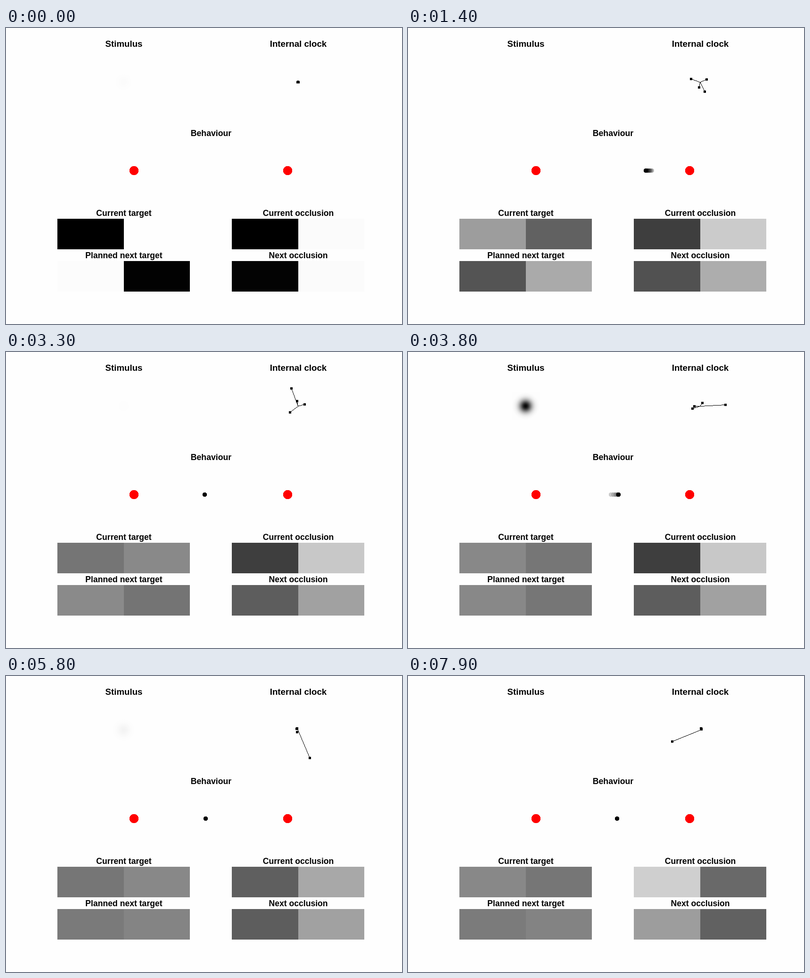
Recreate the animation shown at these times as an HTML page with a canvas. Size 840 by 630 pixels, loop 8 s.

```html
<!DOCTYPE html>
<html lang="en">
<head>
<meta charset="utf-8">
<title>Internal clock</title>
<style>
html, body { margin: 0; width: 100%; height: 100%; overflow: hidden; background: #fefefe; }
canvas { display: block; }
</style>
</head>
<body>
<canvas id="stage" width="840" height="630"></canvas>
<script>
const ctx = document.getElementById('stage').getContext('2d');
const LOOP = 8000, STEP = 100;
const BEAT = 1675, FIRST_FLASH = 420, FLASHES = 4;

// Each hand turns clockwise at its own rate (degrees per ms) and changes length once.
const hands = [
  { phase: 100, rate: 360 / BEAT, early: 20, late: 64, when: 3350, width: 350 },
  { phase: -7, rate: 0.041, early: 22, late: 4, when: 3900, width: 120 },
  { phase: 21, rate: 0.0855, early: 11, late: 4, when: 3900, width: 120 },
  { phase: 201, rate: 0.384, early: 15, late: 4, when: 3900, width: 120 }
];

const titles = [
  ['Stimulus', 250, 40, 18.7], ['Internal clock', 620, 40, 18.7], ['Behaviour', 435, 230, 17.7],
  ['Current target', 250, 400, 17.6], ['Current occlusion', 620, 400, 17.6],
  ['Planned next target', 250, 490, 17.6], ['Next occlusion', 620, 490, 17.6]
];

// Smooth step from 0 to 1, and a soft square wave that flips sign on every beat.
const ramp = (t, when, width) => 1 / (1 + Math.exp((when - t) / width));
const square = (t, flip) => Math.tanh(6 * Math.sin(Math.PI * (t - flip) / BEAT));
const bell = d => Math.exp(-d * d / 2);
const decay = (t, tau) => Math.exp((500 - t) / tau);
const gray = v => {
  const c = Math.round(Math.min(255, Math.max(0, v)));
  return `rgb(${c},${c},${c})`;
};

// Hard-edged disc around the centre of pixel (x, y).
function disc(x, y, r, color) {
  ctx.fillStyle = color;
  const reach = Math.floor(r);
  for (let dy = -reach; dy <= reach; dy++) {
    const half = Math.floor(Math.sqrt(r * r - dy * dy));
    ctx.fillRect(Math.round(x) - half, y + dy, 2 * half + 1, 1);
  }
}

// Hard-edged line, one pixel wide.
function line(x0, y0, x1, y1) {
  const n = Math.max(Math.abs(x1 - x0), Math.abs(y1 - y0), 1);
  for (let i = 0; i <= n; i++) {
    ctx.fillRect(Math.round(x0 + (x1 - x0) * i / n), Math.round(y0 + (y1 - y0) * i / n), 1, 1);
  }
}

function pair(x, y, left, right) {
  ctx.fillStyle = gray(left);
  ctx.fillRect(x, y, 141, 65);
  ctx.fillStyle = gray(right);
  ctx.fillRect(x + 141, y, 140, 65);
}

function drawTitles() {
  ctx.fillStyle = '#000';
  ctx.textAlign = 'center';
  for (const [text, x, y, size] of titles) {
    ctx.font = `bold ${size}px "Liberation Sans", Arial, sans-serif`;
    ctx.fillText(text, x, y);
  }
}

function drawStimulus(t) {
  const x = 249.5, y = 115, r = 30, stops = 15;
  let strength = 0;
  for (let i = 0; i < FLASHES; i++) strength += bell((t - FIRST_FLASH - i * BEAT) / 142);
  const glow = ctx.createRadialGradient(x, y, 0, x, y, r);
  for (let i = 0; i <= stops; i++) {
    const alpha = strength * bell(i / stops * r / 9.2);
    glow.addColorStop(i / stops, `rgba(0,0,0,${alpha.toFixed(4)})`);
  }
  ctx.fillStyle = glow;
  ctx.fillRect(x - r, y - r, 2 * r, 2 * r);
}

function drawClock(t) {
  const cx = 619, cy = 115;
  ctx.fillStyle = '#000';
  for (const { phase, rate, early, late, when, width } of hands) {
    const a = (phase - rate * t) * Math.PI / 180;
    const length = ramp(t, 250, 90) * (early + (late - early) * ramp(t, when, width));
    const x = Math.round(cx + length * Math.cos(a));
    const y = Math.round(cy - length * Math.sin(a));
    line(cx, cy, x, y);
    ctx.fillRect(x - 2, y - 2, 5, 5);
  }
}

// One wide swing to the right, then small alternating shifts.
const dotX = t => 434 + 69 * bell((t - 1000) / 600) + (16 - t / 1100) * square(t, 200);

function drawBehaviour(t) {
  disc(271, 303, 9.5, '#f00');
  disc(597, 303, 9.5, '#f00');
  for (let i = 7; i >= 0; i--) {
    const past = t - i * 40;
    if (past > 0) disc(dotX(past), 303, 4.7, gray(i * 29));
  }
}

function drawPanels(t) {
  const target = Math.max(0, 127 + square(t, 200) * (9 + 90 * decay(t, 620)));
  const plan = 127 - square(t, 1100) * Math.min(125, 5 + 95 * decay(t, 1000));
  const next = 93 * ramp(t, 880, 270) + 64 * ramp(t, 7000, 80);
  const flip = ramp(t, 7300, 80);
  const left = 62 * ramp(t, 250, 50) + 33 * ramp(t, 5100, 90) + 112 * flip;
  const right = 255 - 55 * ramp(t, 650, 250) - 35 * ramp(t, 5300, 200) - 60 * flip;
  pair(109, 406, target, 254 - target);
  pair(109, 496, plan, 254 - plan);
  pair(479, 406, left, right);
  pair(479, 496, next, 254 - next);
}

function draw(t) {
  ctx.fillStyle = '#fefefe';
  ctx.fillRect(0, 0, 840, 630);
  drawTitles();
  drawStimulus(t);
  drawClock(t);
  drawBehaviour(t);
  drawPanels(t);
}

const start = performance.now();
function tick() {
  const t = (performance.now() - start) % LOOP;
  draw(Math.floor(t / STEP) * STEP);
  requestAnimationFrame(tick);
}
tick();
</script>
</body>
</html>
```
